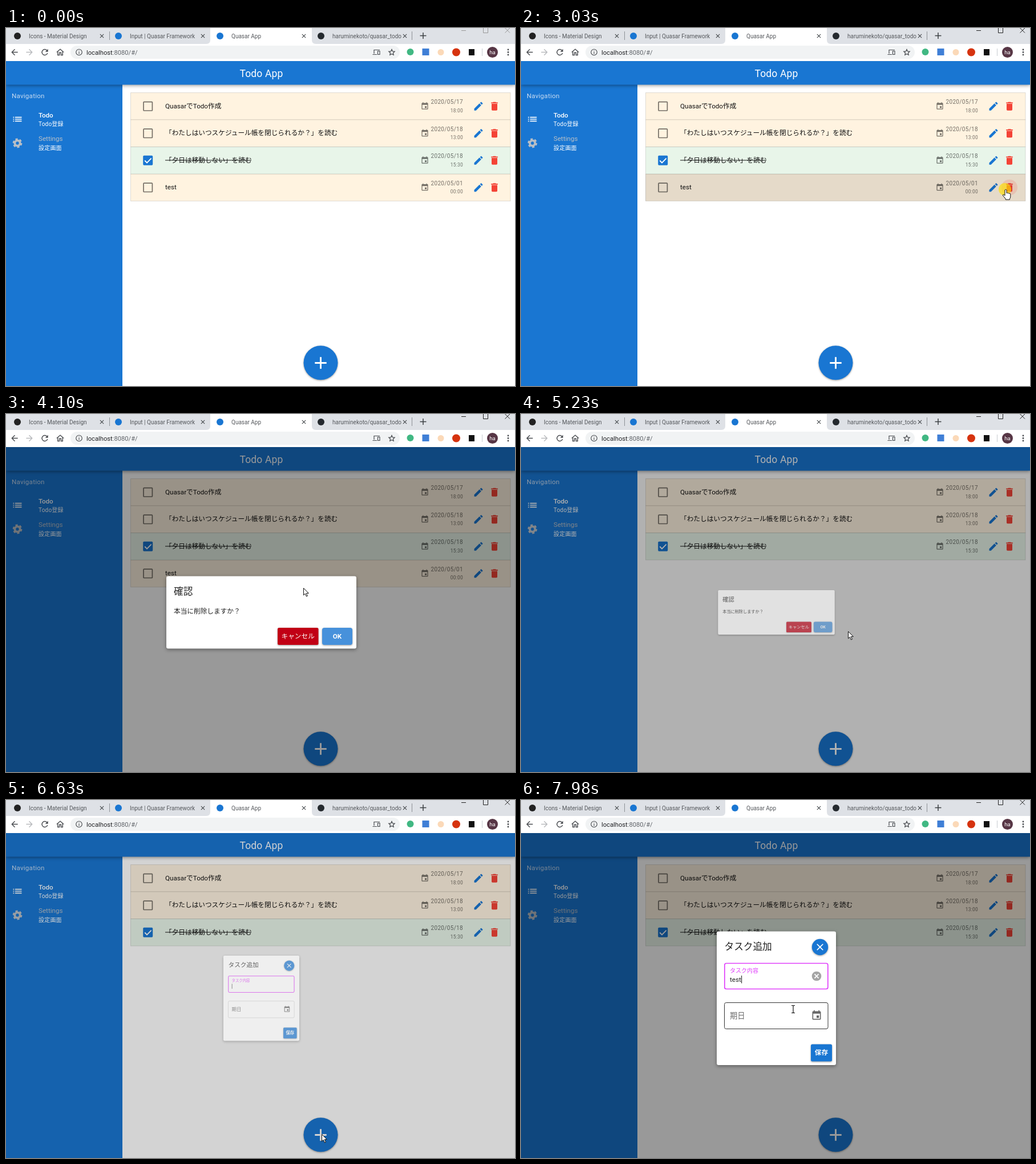
Animation, 892 px wide and 628 px high, one loop 8000 ms. Source, as an HTML page:

```html
<!DOCTYPE html>
<html lang="ja">
<head>
<meta charset="utf-8">
<title>Todo App</title>
<style>
  html, body { margin: 0; width: 100%; height: 100%; overflow: hidden; background: #fff; }
  svg { display: block; font-family: Roboto, "Noto Sans CJK JP", "Noto Sans CJK", sans-serif; }
  text { white-space: pre; }
  .header { filter: drop-shadow(0 1px 3px rgba(0,0,0,.45)); }
  .raised { filter: drop-shadow(0 1.5px 1.5px rgba(0,0,0,.4)); }
  .card { filter: drop-shadow(0 2px 3px rgba(0,0,0,.4)); }
</style>
</head>
<body>
<svg id="stage" width="892" height="628" viewBox="0 0 892 628"></svg>
<script>
const BLUE = '#1976d2', GREY = 'rgba(0,0,0,.54)', RED = '#f44336', DARK = '#4a4d51';
const BODY = 11.67, CAPTION = 10, TITLE = 16.67;

const ICONS = {
  list: 'M3 13h2v-2H3zm0 4h2v-2H3zm0-8h2V7H3zm4 4h14v-2H7zm0 4h14v-2H7zM7 7v2h14V7z',
  event: 'M17 12h-5v5h5zM16 1v2H8V1H6v2H5c-1.1 0-2 .9-2 2v14c0 1.1.9 2 2 2h14c1.1 0 2-.9 2-2V5c0-1.1-.9-2-2-2h-1V1zm3 18H5V8h14z',
  edit: 'M3 17.25V21h3.75L17.81 9.94l-3.75-3.75zM20.71 7.04c.39-.39.39-1.02 0-1.41l-2.34-2.34c-.39-.39-1.02-.39-1.41 0l-1.83 1.83 3.75 3.75z',
  trash: 'M6 19c0 1.1.9 2 2 2h8c1.1 0 2-.9 2-2V7H6zM19 4h-3.5l-1-1h-5l-1 1H5v2h14z',
  add: 'M19 13h-6v6h-2v-6H5v-2h6V5h2v6h6z',
  close: 'M19 6.41L17.59 5 12 10.59 6.41 5 5 6.41 10.59 12 5 17.59 6.41 19 12 13.41 17.59 19 19 17.59 13.41 12z',
  clear: 'M12 2a10 10 0 1 0 0 20a10 10 0 1 0 0-20zm5 13.59L15.59 17 12 13.41 8.41 17 7 15.59 10.59 12 7 8.41 8.41 7 12 10.59 15.59 7 17 8.41 13.41 12z',
  refresh: 'M17.65 6.35A8 8 0 1 0 19.73 14h-2.08A6 6 0 1 1 16.22 7.78L13 11h7V4z',
  back: 'M20 11H7.83l5.59-5.59L12 4l-8 8 8 8 1.41-1.41L7.83 13H20z',
  forward: 'M4 11h12.17l-5.59-5.59L12 4l8 8-8 8-1.41-1.41L16.17 13H4z',
  home: 'M12 5.7l5 4.5V18h-2v-6H9v6H7v-7.8zM12 3L2 12h3v8h6v-6h2v6h6v-8h3z',
  info: 'M11 7h2v2h-2zm0 4h2v6h-2zM12 2a10 10 0 1 0 0 20a10 10 0 1 0 0-20zm0 2a8 8 0 1 1 0 16a8 8 0 1 1 0-16z',
  star: 'M12 4.2l2.4 5.3 5.8.6-4.3 3.9 1.2 5.7-5.1-2.9-5.1 2.9 1.2-5.7-4.3-3.9 5.8-.6z',
};

const icon = (name, cx, cy, size, color, extra = '') =>
  `<path d="${ICONS[name]}" fill="${color}" fill-rule="evenodd" transform="translate(${cx - size / 2} ${cy - size / 2}) scale(${size / 24})" ${extra}/>`;
const text = (x, y, size, color, str, extra = '') =>
  `<text x="${x}" y="${y}" font-size="${size}" fill="${color}" ${extra}>${str}</text>`;
const rect = (x, y, w, h, color, extra = '') =>
  `<rect x="${x}" y="${y}" width="${w}" height="${h}" fill="${color}" ${extra}/>`;
const circle = (x, y, r, color, extra = '') => `<circle cx="${x}" cy="${y}" r="${r}" fill="${color}" ${extra}/>`;
const line = (d, color, width = 1, extra = '') => `<path d="${d}" fill="none" stroke="${color}" stroke-width="${width}" ${extra}/>`;

function tab(x, label, color, closeX) {
  return circle(x, 14, 6, color) + text(x + 20, 17.5, 10, '#55585c', label) +
    icon('close', closeX, 14, 12, '#3c4043');
}

function browser() {
  return rect(0, 0, 892, 28, '#dee1e6') + rect(0, 28, 892, 30, '#fff') +
    '<path d="M351 28q7 0 7-7V0H536V21q0 7 7 7z" fill="#fff"/>' +
    tab(20, 'Icons - Material Design', '#222', 168) +
    tab(197, 'Input | Quasar Framework', BLUE, 345) +
    tab(375, 'Quasar App', BLUE, 522) +
    tab(552, 'haruminekoto/quasar_todo', '#24292e', 699) +
    line('M181.5 6V21M711.5 6V21', '#8d9196') + line('M725.5 13.5h11M731 8v11', '#3c4043', 1.5) +
    line('M798 4.5h8M836.5 -1V8.5H844.5V-1M874.5 0l8.5 8.5M883 0l-8.5 8.5', '#999', 1, 'id="windowButtons"') +
    icon('back', 15, 42.5, 17, DARK) + icon('forward', 41, 42.5, 17, '#b8babd') +
    icon('refresh', 68, 42.5, 17, DARK) + icon('home', 95, 42.5, 17, DARK) +
    rect(113, 31, 577, 23, '#f1f3f4', 'rx="11.5"') + icon('info', 128, 42.5, 14, DARK) +
    text(141, 46.5, 11.2, '#202124', 'localhost<tspan fill="#5f6368">:8080/#/</tspan>') +
    line('M645 45V38.5H655M642.5 46.5H650M651.5 40.5H655V46.5H651.5z', DARK, 1.2) +
    icon('star', 676, 42.5, 15, 'none', `stroke="${DARK}" stroke-width="2"`) +
    circle(708.5, 42, 6, '#41b883') + rect(729.5, 36, 12, 12, '#3f7fd6') +
    circle(762, 42.5, 5.5, '#fbd9b8') + circle(789, 42.5, 7, '#d6330f') + rect(811, 37, 10, 11, '#111') +
    line('M834.5 36V49', '#c9ccd0') + circle(852.5, 42.5, 9.5, '#573645') +
    text(852.5, 45.5, 9.5, '#fff', 'ha', 'text-anchor="middle"') +
    [38, 42.5, 47].map(y => circle(880, y, 1.4, DARK)).join('');
}

function sidebar() {
  const gear = '#b9bfc6', spaced = 'letter-spacing=".2"';
  return rect(0, 58, 204, 570, BLUE) +
    text(10, 123, BODY, '#c6daf1', 'Navigation', spaced) +
    icon('list', 20, 160, 20, '#fff') +
    text(57, 156.5, BODY, '#fff', 'Todo', 'font-weight="500"') + text(57, 172, CAPTION, '#fff', 'Todo登録', spaced) +
    circle(20, 202, 4.6, 'none', `stroke="${gear}" stroke-width="3.8"`) +
    circle(20, 202, 7, 'none', `stroke="${gear}" stroke-width="2.8" stroke-dasharray="4 3.33"`) +
    text(57, 198, BODY, gear, 'Settings') + text(57, 213.5, CAPTION, '#fff', '設定画面', spaced);
}

function row(index, label, date, time, done) {
  const top = 113.5 + index * 47.5, mid = top + 23.7;
  const box = done
    ? rect(240.2, mid - 8.4, 17, 17, BLUE, 'rx="1.7"') + line(`M243.2 ${mid + .3}l3.8 3.9 7.6-7.8`, '#fff', 1.8)
    : rect(241, mid - 7.6, 15.4, 15.4, 'none', `rx="1" stroke="${GREY}" stroke-width="1.7"`);
  return rect(218.5, top, 665.5, 47.5, done ? '#e8f5e9' : '#fff3e0', 'stroke="rgba(0,0,0,.12)"') + box +
    text(279, mid + 3.5, BODY, '#111', label) +
    (done ? line(`M279 ${mid - .2}H430`, '#111') : '') +
    icon('event', 734, mid, 15, GREY) +
    text(744.5, mid - 4.2, CAPTION, GREY, date, 'letter-spacing=".33"') +
    text(801, mid + 10.3, 8.33, GREY, time, 'letter-spacing=".28" text-anchor="end"') +
    icon('edit', 828, mid, 20, BLUE) + icon('trash', 856, mid, 20, RED);
}

function page() {
  return rect(0, 58, 892, 570, '#fff') + sidebar() +
    rect(0, 58, 892, 41.5, BLUE, 'class="header"') +
    text(447.5, 86, 17.5, '#fff', 'Todo App', 'text-anchor="middle" letter-spacing=".17"') +
    row(0, 'QuasarでTodo作成', '2020/05/17', '18:00') +
    row(1, '「わたしはいつスケジュール帳を閉じられるか？」を読む', '2020/05/18', '13:00') +
    '<g id="lastRow">' + row(3, 'test', '2020/05/01', '00:00') +
    rect(218, 256, 666, 47.5, '#000', 'id="rowHover"') +
    circle(856, 279.7, 14, RED, 'id="trashHover"') + '</g>' +
    row(2, '「夕日は移動しない」を読む', '2020/05/18', '15:30', true) +
    circle(551.5, 587.3, 30, BLUE, 'class="raised"') + icon('add', 551.5, 587.5, 35, '#fff');
}

function confirmDialog() {
  return '<g id="confirm">' + rect(281, 284.5, 333, 127, '#fff', 'rx="3.3" class="card"') +
    text(294, 317, TITLE, '#222', '確認') + text(294, 350, BODY, '#222', '本当に削除しますか？') +
    rect(476, 375, 71.5, 30, '#c10015', 'rx="2.5" class="raised"') +
    rect(476, 375, 71.5, 30, '#fff', 'rx="2.5" id="cancelHover"') +
    text(511.7, 394, BODY, '#fff', 'キャンセル', 'text-anchor="middle" font-weight="500"') +
    rect(554, 375, 53, 30, '#4791db', 'rx="4" class="raised"') +
    text(580.5, 394, BODY, '#fff', 'OK', 'text-anchor="middle" font-weight="700"') + '</g>';
}

function addDialog() {
  const accent = '#e040fb';
  return '<g id="add">' + rect(343, 230.5, 209, 234.5, '#fff', 'rx="3.3" class="card"') +
    text(356.5, 262.5, TITLE, '#222', 'タスク追加') +
    circle(524, 258, 14.2, BLUE, 'class="raised"') + icon('close', 524, 258, 20, '#fff') +
    rect(356.8, 286.5, 181, 45, 'none', `rx="3" stroke="${accent}" stroke-width="1.7"`) +
    text(366, 303, CAPTION, accent, 'タスク内容') +
    text(366, 318.5, BODY, '#222', '', 'id="typed"') + rect(366, 308, 1, 13.5, '#111', 'id="caret"') +
    icon('clear', 518, 309, 20, '#a5a5a5', 'id="clear"') +
    rect(356.5, 355.5, 181.5, 46, 'none', 'rx="3" id="dateField"') +
    text(366, 383, 13.33, 'rgba(0,0,0,.6)', '期日') + icon('event', 518, 378, 20, '#686868') +
    rect(508, 428.5, 37, 30, BLUE, 'rx="2.5" class="raised"') +
    text(526.5, 447, BODY, '#fff', '保存', 'text-anchor="middle" font-weight="700"') + '</g>';
}

function cursor() {
  const outline = 'fill="#fff" stroke="#111" stroke-linejoin="round"';
  return '<g id="cursor">' + circle(0, 0, 11, '#ffe100', 'id="click" opacity=".65"') +
    `<path id="arrow" d="M.5.5V12.8L3.3 10.2 5.4 15 7.4 14.1 5.3 9.4H9.3z" ${outline}/>` +
    `<path id="hand" d="M0 1.2q1.5-1.8 3 0V6.5q1.5-1 2.5.3 1.6-.8 2.4.5 1.9-.4 1.9 1.5V13q0 2-1.4 3.6V18H1.2V16.5L-3.4 11q-.7-2 1.2-1.8L0 11z" ${outline}/>` +
    '<path id="beam" d="M-3-6.5h2.2L0-5.8.8-6.5H3M0-6V6M-3 6.5h2.2L0 5.8.8 6.5H3" fill="none" stroke="#111" stroke-width="1.2"/></g>';
}

document.getElementById('stage').innerHTML = page() +
  rect(0, 58, 892, 570, '#000', 'id="backdrop"') + confirmDialog() + addDialog() + browser() + cursor();

const ui = {};
document.querySelectorAll('[id]').forEach(el => ui[el.id] = el);

const LOOP = 8000;
// The screen was refreshed in bursts: [first, last, count].
const BURSTS = [[210, 460, 4], [860, 920, 2], [1170, 1330, 3], [1560, 1560, 1], [1710, 1710, 1], [1860, 2020, 3],
  [2170, 2960, 11], [3030, 3800, 11], [3870, 4100, 4], [4340, 4750, 6], [4920, 4920, 1], [5060, 5850, 11],
  [5930, 6080, 3], [6400, 7180, 11], [7330, 7980, 9]];
const REFRESHES = BURSTS.flatMap(([first, last, count]) => Array.from({ length: count },
  (_, i) => Math.round((first + (last - first) * i / Math.max(1, count - 1)) / 10) * 10));

const POINTER = [[0, 770, 640], [150, 770, 640], [460, 615, 596], [800, 615, 596], [920, 593, 526], [1090, 593, 526],
  [1330, 726, 321], [1500, 726, 321], [1560, 726, 303], [1650, 726, 303], [1710, 726, 320], [1800, 726, 320],
  [2020, 893, 331], [2100, 893, 336], [2170, 884, 336], [2960, 848, 283], [3260, 848, 283], [3800, 725, 284],
  [4030, 515, 300], [4100, 521, 305], [4260, 521, 305], [4600, 533, 378], [4750, 573, 381], [5390, 573, 381],
  [5850, 556, 563], [6080, 553, 586], [6800, 553, 586], [7180, 470, 386], [7480, 477, 367], [LOOP, 477, 367]];

const ramp = (t, from, to) => Math.min(1, Math.max(0, (t - from) / (to - from)));
const during = (t, ...spans) => spans.some(([from, to]) => t >= from && t < to);
const show = (el, on) => el.setAttribute('visibility', on ? 'inherit' : 'hidden');
const fade = (el, opacity) => el.setAttribute('opacity', opacity);
const cubicOut = p => 1 - (1 - p) ** 3;
const sineOut = p => Math.sin(p * Math.PI / 2);

const OPEN_CONFIRM = 3060, CLOSE_CONFIRM = 5175, OPEN_ADD = 6544, FADE = 300;

function toggle(t, open, close, ease) {
  return ease(ramp(t, open, open + FADE)) - ease(ramp(t, close, close + FADE));
}

function pose(dialog, amount, cx, cy) {
  fade(dialog, amount);
  dialog.setAttribute('transform', `translate(${cx * (1 - amount)} ${cy * (1 - amount)}) scale(${amount})`);
}

function pointerAt(t) {
  const i = POINTER.findIndex(([time]) => time > t);
  const [t0, x0, y0] = POINTER[i - 1], [t1, x1, y1] = POINTER[i];
  const p = ramp(t, t0, t1), s = p * p * (3 - 2 * p);
  return [x0 + (x1 - x0) * s, y0 + (y1 - y0) * s];
}

function draw(now) {
  const time = now % LOOP;
  const t = REFRESHES.filter(r => r <= time).pop() || 0;

  pose(ui.confirm, toggle(t, OPEN_CONFIRM, CLOSE_CONFIRM, cubicOut), 447.5, 348);
  pose(ui.add, toggle(t, OPEN_ADD, LOOP, cubicOut), 447.5, 347.8);
  fade(ui.backdrop, .4 * (toggle(t, OPEN_CONFIRM, CLOSE_CONFIRM, sineOut) + toggle(t, OPEN_ADD, LOOP, sineOut)));

  show(ui.lastRow, t < CLOSE_CONFIRM);
  fade(ui.rowHover, .1 * (ramp(t, 2700, 3000) - ramp(t, 3060, 3180)));
  fade(ui.trashHover, .15 * (ramp(t, 2800, 3000) - ramp(t, 3200, 3400)));
  fade(ui.cancelHover, .15 * (ramp(t, 4500, 4700) - ramp(t, 4720, 4900)));
  ui.windowButtons.setAttribute('stroke', t < 3030 ? '#999' : '#222');

  const typed = 'test'.slice(0, [7400, 7560, 7700, 7900].filter(key => t >= key).length);
  if (ui.typed.textContent !== typed) ui.typed.textContent = typed;
  ui.caret.setAttribute('x', 366.3 + (typed ? ui.typed.getComputedTextLength() : 0));
  show(ui.clear, typed);
  ui.dateField.setAttribute('stroke', t < 7180 ? 'rgba(0,0,0,.24)' : '#333');

  const hand = during(t, [2800, 3120], [4500, 5200], [5850, 6600]), beam = t >= 7180;
  show(ui.hand, hand);
  show(ui.beam, beam);
  show(ui.arrow, !hand && !beam);
  show(ui.click, during(t, [3030, 3100], [5060, 5130], [6400, 6470]));
  ui.cursor.setAttribute('transform', `translate(${pointerAt(t).join(' ')})`);
  requestAnimationFrame(draw);
}
requestAnimationFrame(draw);
</script>
</body>
</html>
```
